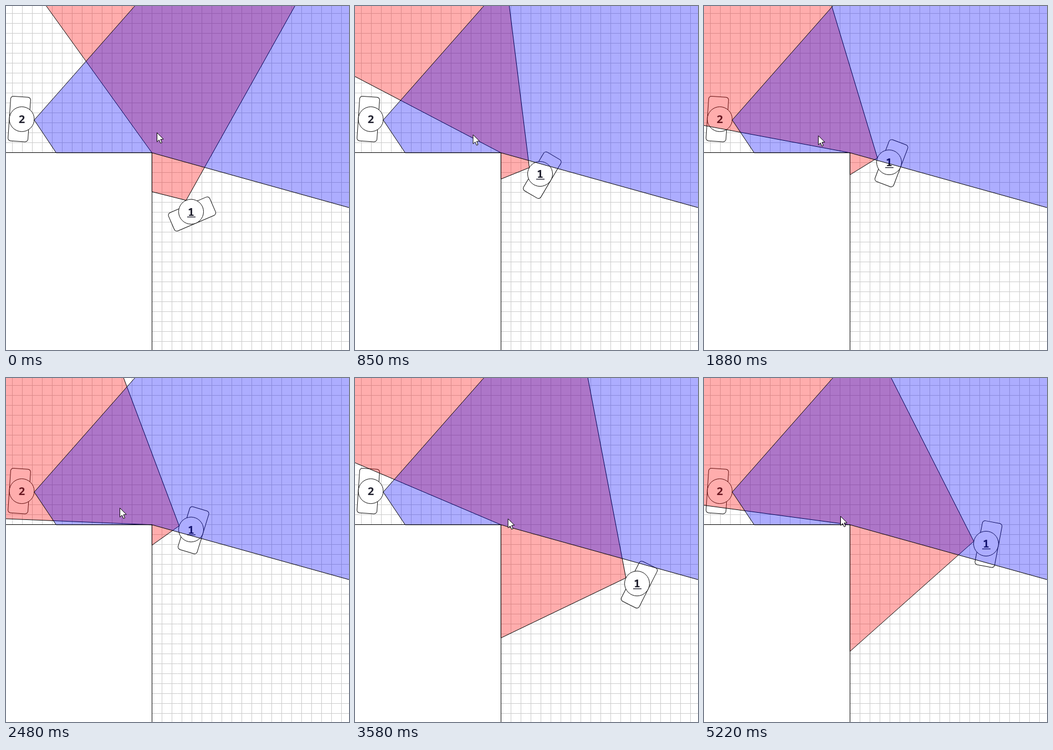
Recreate the animation shown at these times as an HTML page with a canvas. Size 619 by 623 pixels, loop 5550 ms.

```html
<!DOCTYPE html>
<html lang="en">
<head>
<meta charset="utf-8">
<title>Field of view around a corner</title>
<style>
  html, body { margin: 0; width: 100%; height: 100%; overflow: hidden; background: #fff; }
  canvas { display: block; }
</style>
</head>
<body>
<canvas id="stage" width="619" height="623"></canvas>
<script>
const W = 619, H = 623, LOOP = 5550, TICK = LOOP / 80;
const CELL = 18, WALL_X = 263.5, WALL_Y = 265.5, FAR = 4000;
const CORNER = { x: 263.3, y: 265.8 };
const RADIUS = 22.5, HALF_VIEW = 52.5 * Math.PI / 180;

const stage = document.getElementById("stage").getContext("2d");
const layerCanvas = document.createElement("canvas");
layerCanvas.width = W;
layerCanvas.height = H;
const layer = layerCanvas.getContext("2d");

const mix = (a, b, f) => a + (b - a) * f;
const ramp = (t, start, end) => Math.max(0, Math.min(1, (t - start) / (end - start)));

const watcher = { x: 28.5, y: 205, heading: 3.8 * Math.PI / 180, label: "2" };

// Walker 1 moves straight up in two walks and always faces the pointer.
function nearTake(t) {
  const first = ramp(t, 0, 840), second = ramp(t, 1530, 2020);
  const settle = 1 - Math.exp(-t / 338);
  return {
    x: 334,
    y: mix(372.6, 303.5, first) - 29.1 * second,
    pointer: { x: mix(272, 207, settle) - 2 * second, y: mix(229, 233, settle) + 2 * second }
  };
}

function farTake(t) {
  const first = ramp(t, 3030, 3640), second = ramp(t, 4260, 5060);
  const drift = second * second;
  return {
    x: 509,
    y: mix(413, 364, first) - 64 * second,
    pointer: { x: mix(284, 274, first) - 28 * drift, y: mix(257, 254, first) - 4 * drift }
  };
}

function along(p, angle, distance) {
  return { x: p.x + Math.cos(angle) * distance, y: p.y + Math.sin(angle) * distance };
}

function angleTo(from, to) {
  return Math.atan2(to.y - from.y, to.x - from.x);
}

function drawPolygon(ctx, points, fill) {
  ctx.beginPath();
  points.forEach(p => ctx.lineTo(p.x, p.y));
  ctx.closePath();
  ctx.fillStyle = fill;
  ctx.fill();
  ctx.strokeStyle = "#000";
  ctx.stroke();
}

function drawRoom(ctx) {
  ctx.fillStyle = "#fff";
  ctx.fillRect(0, 0, W, H);
  ctx.beginPath();
  for (let x = WALL_X % CELL; x < W; x += CELL) { ctx.moveTo(x, 0); ctx.lineTo(x, H); }
  for (let y = WALL_Y % CELL; y < H; y += CELL) { ctx.moveTo(0, y); ctx.lineTo(W, y); }
  ctx.strokeStyle = "#ccc";
  ctx.stroke();

  ctx.beginPath();
  ctx.rect(-5, WALL_Y, WALL_X + 5, H);
  ctx.fill();
  ctx.strokeStyle = "#000";
  ctx.stroke();
}

function drawAgent(ctx, { x, y, heading, label, selected }) {
  ctx.save();
  ctx.translate(x, y);
  ctx.fillStyle = "#fff";
  ctx.strokeStyle = "#111";
  ctx.rotate(heading);
  ctx.beginPath();
  ctx.roundRect(-22.5, -40.5, 36, 81, 5);
  ctx.fill();
  ctx.stroke();
  ctx.rotate(-heading);
  ctx.beginPath();
  ctx.arc(0, 0, RADIUS, 0, Math.PI * 2);
  ctx.fill();
  ctx.stroke();
  ctx.fillStyle = "#222230";
  ctx.font = "bold 20px 'Noto Sans Mono', 'DejaVu Sans', monospace";
  ctx.textAlign = "center";
  ctx.fillText(label, 0, 7.3);
  if (selected) ctx.fillRect(-7, 8.8, 15, 1.4);
  ctx.restore();
}

// side is +1 if the open edge lies clockwise of the heading; the other edge meets the wall.
function drawView(ctx, agent, side, wallDistance, color) {
  const eye = along(agent, agent.heading, RADIUS);
  const blocked = agent.heading - side * HALF_VIEW;
  drawPolygon(ctx, [
    eye,
    along(eye, agent.heading + side * HALF_VIEW, FAR),
    along(CORNER, angleTo(eye, CORNER), FAR),
    CORNER,
    along(eye, blocked, wallDistance(eye, blocked))
  ], color);
}

function drawPointer(ctx, { x, y }) {
  const outline = [[0, 0], [0, 16.5], [3.8, 13], [6.4, 19], [9, 17.9], [6.5, 12], [11.6, 11.6]];
  drawPolygon(ctx, outline.map(([dx, dy]) => ({ x: x + dx + 0.5, y: y + dy + 0.5 })), "#fff");
}

function drawScene(ctx, { x, y, pointer }) {
  const walker = { x, y, heading: angleTo({ x, y }, pointer), label: "1", selected: true };
  drawRoom(ctx);
  drawAgent(ctx, walker);
  drawAgent(ctx, watcher);
  drawView(ctx, walker, 1, (eye, a) => (CORNER.x - eye.x) / Math.cos(a), "rgba(255,0,0,.32)");
  drawView(ctx, watcher, -1, (eye, a) => (CORNER.y - eye.y) / Math.sin(a), "rgba(0,0,255,.32)");
  drawPointer(ctx, pointer);
}

const startTime = performance.now();

function render() {
  const elapsed = (performance.now() - startTime) % LOOP;
  const t = Math.floor(elapsed / TICK) * TICK;
  drawScene(stage, nearTake(t));
  drawScene(layer, farTake(t));
  stage.globalAlpha = ramp(t, 2480, 2980);
  stage.drawImage(layerCanvas, 0, 0);
  stage.globalAlpha = 1;
  requestAnimationFrame(render);
}
render();
</script>
</body>
</html>
```
